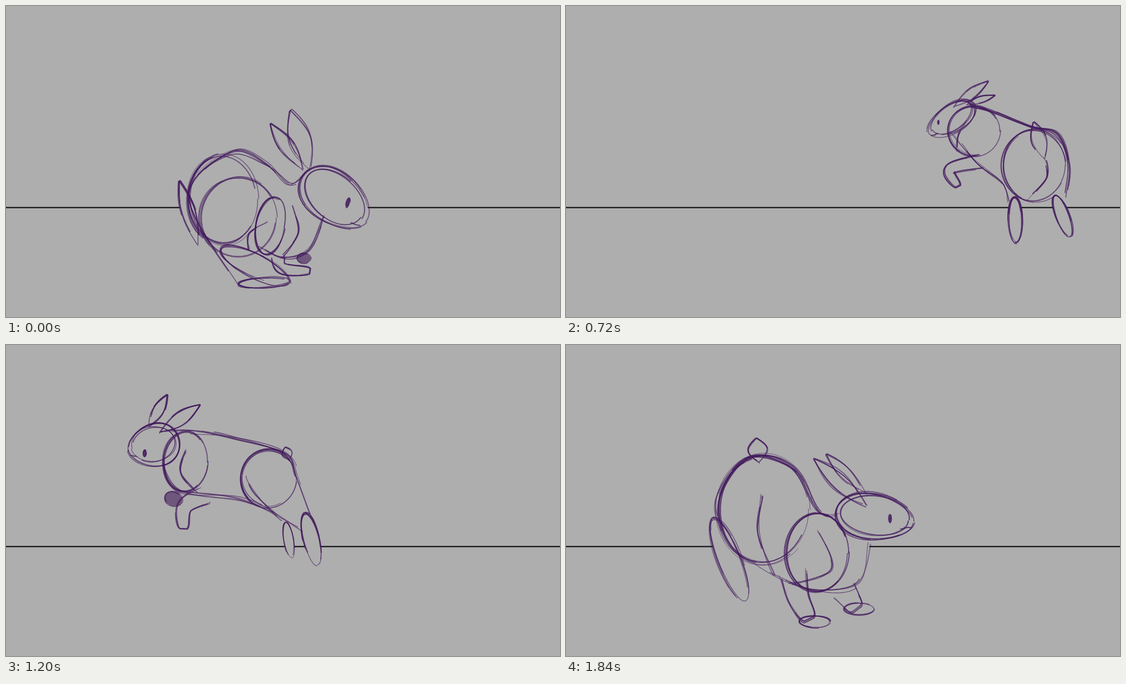
Recreate the animation shown at these times as an HTML page with a canvas. Size 998x561 px, loop 1920 ms.

```html
<!DOCTYPE html>
<html lang="en">
<head>
<meta charset="utf-8">
<title>Rabbit run, rough sketch</title>
<style>
html, body { margin: 0; width: 100%; height: 100%; overflow: hidden; background: #aeaeae; }
canvas { display: block; }
</style>
</head>
<body>
<canvas id="stage" width="998" height="561"></canvas>
<script>
const ctx = document.getElementById('stage').getContext('2d');
const LOOP = 1920, TICK = 40, N = 48, PAPER = '#aeaeae', INK = '#421a5c';
const TAU = 2 * Math.PI;
const sample = f => Array.from({ length: N }, (_, i) => f(i / (N - 1)));

// Shape builders: each turns a few numbers into an outline

function egg(cx, cy, rx, ry, deg = 0, taper = .14) {
  const r = deg * Math.PI / 180, c = Math.cos(r), s = Math.sin(r);
  return sample(t => {
    const u = Math.cos(t * TAU), x = rx * u, y = ry * Math.sin(t * TAU) * (1 - taper * u);
    return [cx + x * c - y * s, cy + x * s + y * c];
  });
}

const ellipse = (cx, cy, rx, ry, deg) => egg(cx, cy, rx, ry, deg, 0);

// Smooth curve through x,y pairs
function curve(...v) {
  const last = v.length / 2 - 1;
  const at = (i, k) => v[Math.max(0, Math.min(last, i)) * 2 + k];
  return sample(t => {
    const u = t * last, j = Math.min(last - 1, Math.floor(u)), f = u - j;
    return [0, 1].map(k => {
      const a = at(j - 1, k), b = at(j, k), c = at(j + 1, k), d = at(j + 2, k);
      return b + f / 2 * (c - a + f * (2 * a - 5 * b + 4 * c - d + f * (3 * (b - c) + d - a)));
    });
  });
}

// Rounded foot between two ends
const foot = (x0, y0, x1, y1, w) =>
  ellipse((x0 + x1) / 2, (y0 + y1) / 2, Math.hypot(x1 - x0, y1 - y0) / 2, w,
    Math.atan2(y1 - y0, x1 - x0) * 180 / Math.PI);

// Ear or tail with a pointed tip
function leaf(x0, y0, x1, y1, w) {
  const dx = x1 - x0, dy = y1 - y0, len = Math.hypot(dx, dy);
  return sample(t => {
    const u = 1 - Math.abs(1 - 2 * t), side = (t < .5 ? 1 : -1) * w * Math.sin(Math.PI * u) / len;
    return [x0 + dx * u - dy * side, y0 + dy * u + dx * side];
  });
}

// Leg along shoulder, knee and paw, open at the top
function limb(sx, sy, kx, ky, px, py, w) {
  const bone = curve(sx, sy, kx, ky, px, py);
  const edge = side => bone.slice(1).map(([x, y], i) => {
    const dx = x - bone[i][0], dy = y - bone[i][1], len = Math.hypot(dx, dy) || 1, u = i / N;
    const half = side * w * (1.5 - .6 * u) * Math.sqrt(1 - u ** 10);
    return [x - dy / len * half, y + dx / len * half];
  });
  return [...edge(1), ...edge(-1).reverse()].filter((_, i) => i % 2);
}

// Builder and number of pencil passes for each part
const parts = {
  rump: [ellipse, 7], chest: [ellipse, 5], thigh: [ellipse, 5], head: [egg, 5],
  back: [curve, 6], belly: [curve, 4], haunch: [curve, 4], blade: [curve, 4],
  tail: [leaf, 4], earA: [leaf, 4], earB: [leaf, 4],
  hindA: [foot, 6], hindB: [foot, 5], foreA: [limb, 4], foreB: [limb, 4],
  pawA: [ellipse, 4], pawB: [ellipse, 4], dark: [ellipse, 3],
  eye: [ellipse, 2], eye2: [ellipse, 2], nose: [ellipse, 2]
};
const solid = ['eye', 'eye2', 'nose', 'dark'];

const crouch = {
  rump: [391, 349, 63, 82, 0], chest: [476, 397, 26, 53, 10], thigh: [419, 382, 70, 73, 0],
  head: [592, 347, 70, 46, 38], eye: [616, 355, 3, 9, 15],
  earA: [535, 296, 476, 210, 13], earB: [547, 295, 512, 186, 20], tail: [345, 430, 312, 313, 13],
  back: [545, 299, 513, 322, 470, 285, 405, 265, 330, 345, 420, 498],
  belly: [572, 380, 545, 440, 500, 454, 455, 432],
  haunch: [437, 440, 437, 412, 470, 388], blade: [515, 362, 527, 410, 497, 452],
  hindA: [386, 438, 512, 499, 21], hindB: [418, 502, 511, 496, 9],
  foreA: [490, 452, 498, 474, 548, 477, 8], dark: [537, 455, 12, 9, 0]
};

const rear = {
  rump: [822, 309, 64, 73, 0], tail: [820, 290, 822, 217, 17],
  back: [780, 241, 822, 234, 862, 246, 887, 285, 893, 340, 885, 405],
  belly: [768, 360, 800, 385, 850, 410, 880, 398],
  haunch: [794, 353, 828, 333, 851, 348], blade: [819, 285, 816, 330, 823, 377],
  hindA: [783, 308, 744, 404, 16], hindB: [870, 303, 869, 415, 14],
  foreA: [828, 395, 829, 420, 837, 444, 11], pawA: [838, 446, 14, 7, 0],
  foreB: [873, 400, 872, 418, 868, 434, 10], pawB: [867, 434, 14, 6, 0]
};

const leap = {
  rump: [844, 288, 58, 65, 0], chest: [735, 225, 46, 45, 0],
  head: [694, 204, -48, 25, -33], eye: [671, 210, 1.5, 4, 0],
  earA: [698, 182, 762, 135, 9], earB: [722, 178, 774, 160, 6], tail: [862, 276, 842, 208, 13],
  back: [730, 179, 765, 187, 835, 218, 885, 232, 907, 285, 902, 342],
  belly: [694, 226, 735, 278, 785, 318, 797, 355],
  haunch: [862, 272, 866, 310, 830, 350], blade: [722, 206, 706, 235, 704, 262],
  hindA: [808, 345, 811, 427, 12], hindB: [881, 342, 908, 416, 12],
  foreA: [750, 280, 692, 295, 706, 325, 8]
};

const land = {
  rump: [643, 287, 48, 51, 0], chest: [567, 334, 29, 44, 0],
  head: [503, 287, -45, 25, -5], eye: [486, 282, 1.7, 5, 10],
  earA: [522, 266, 560, 207, 8], earB: [535, 276, 578, 218, 9], tail: [678, 248, 655, 213, 9],
  back: [548, 296, 580, 262, 615, 240, 655, 231, 684, 258, 700, 288],
  belly: [513, 314, 525, 358, 565, 380, 655, 345],
  haunch: [574, 331, 586, 344, 602, 348], blade: [548, 318, 545, 350, 578, 381],
  hindA: [698, 286, 682, 380, 13], dark: [640, 355, 20, 8, -40],
  foreA: [583, 375, 590, 395, 585, 410, 11], pawA: [582, 412, 19, 7, 0],
  foreB: [550, 372, 545, 388, 535, 396, 8], pawB: [533, 397, 14, 6, 0]
};

const flight = {
  rump: [473, 241, 49, 52, 0], chest: [323, 211, 40, 55, 0],
  head: [266, 181, -47, 37, -12], eye: [250, 195, 3, 6, 0],
  earA: [258, 147, 291, 89, 10], earB: [277, 158, 350, 108, 11], tail: [510, 207, 503, 184, 9],
  back: [290, 157, 340, 157, 400, 165, 500, 193, 525, 240, 550, 305],
  belly: [280, 205, 310, 262, 430, 280, 540, 335],
  haunch: [433, 235, 448, 268, 498, 318], blade: [324, 190, 314, 230, 345, 266],
  hindA: [539, 303, 560, 397, 14], hindB: [504, 320, 514, 384, 9],
  foreA: [360, 270, 322, 292, 320, 331, 11], dark: [302, 278, 16, 13, 20]
};

const spring = {
  rump: [163, 297, 53, 60, 0], chest: [264, 255, 47, 55, 0],
  head: [337, 207, 55, 38, 25], eye: [343, 218, 2.5, 6.5, -5],
  eye2: [379, 216, 2, 5, 0], nose: [363, 233, 5.5, 2, 0],
  earA: [310, 180, 231, 135, 11], earB: [345, 170, 303, 113, 9],
  back: [290, 182, 240, 205, 190, 220, 145, 242, 112, 285, 105, 345],
  belly: [318, 245, 300, 305, 218, 300, 185, 352],
  haunch: [143, 268, 151, 305, 107, 382], blade: [248, 228, 268, 270, 235, 318],
  hindA: [114, 348, 88, 419, 12], hindB: [179, 348, 176, 420, 10],
  foreA: [235, 312, 255, 340, 263, 374, 13], foreB: [290, 308, 315, 328, 333, 356, 9]
};

const brake = {
  rump: [357, 297, 83, 97, 0], chest: [452, 375, 56, 70, 0],
  head: [556, 310, 70, 41, 8], eye: [584, 313, 3, 8, 0],
  earA: [540, 290, 445, 204, 15], earB: [540, 268, 467, 196, 10], tail: [348, 212, 343, 167, 17],
  back: [490, 306, 455, 298, 410, 222, 330, 204, 273, 275, 280, 335],
  belly: [548, 355, 525, 432, 440, 441, 340, 395],
  haunch: [353, 270, 347, 340, 375, 415], blade: [452, 333, 479, 405, 400, 432],
  hindA: [266, 312, 322, 464, 21],
  foreA: [408, 408, 418, 455, 440, 495, 16], pawA: [448, 499, 28, 11, 0],
  foreB: [500, 442, 512, 460, 525, 476, 15], pawB: [528, 476, 28, 11, 0]
};

// Move the rump to x,y and scale around it; a negative sx mirrors
function place(pose, x, y, sx = 1, sy = 1) {
  const [ox, oy] = pose.rump, round = [ellipse, egg];
  const X = n => x + (n - ox) * sx, Y = n => y + (n - oy) * sy;
  return Object.fromEntries(Object.entries(pose).map(([name, v]) => {
    if (round.includes(parts[name][0])) {
      const [cx, cy, rx, ry, deg] = v;
      return [name, [X(cx), Y(cy), rx * sx, ry * sy, deg * Math.sign(sx)]];
    }
    // An odd last number is a width
    return [name, v.map((n, i) => i % 2 ? Y(n) : i === v.length - 1 ? n * sy : X(n))];
  }));
}

const keys = [
  [0, crouch],
  [80, place(flight, 506, 343, -1)],
  [200, place(flight, 620, 258, -.97, .93)],
  [320, place(brake, 763, 292, .62, .75)],
  [400, rear],
  [480, place(rear, 835, 319, 1.05, .94)],
  [560, place(crouch, 880, 347, -.6, .66)],
  [720, leap],
  [760, place(flight, 798, 280, .88, .82)],
  [880, land],
  [1000, place(crouch, 563, 332, -.72, .66)],
  [1120, place(flight, 545, 300, .88, .98)],
  [1200, flight],
  [1320, place(flight, 338, 276, .94, .89)],
  [1360, place(land, 257, 281, 1, 1.1)],
  [1440, place(land, 202, 303, .72, 1.07)],
  [1560, place(crouch, 121, 347, .57, .66)],
  [1680, spring],
  [1760, place(spring, 252, 320, 1.1)],
  [1840, brake],
  [LOOP, crouch]
];

// Drawings are held for one or two ticks, mostly in turn
const holds = [2, 2, 1, 2, 1, 2, 2, 1, 1, 2, ...Array(9).fill([2, 1]).flat(), 1, 1, 1, 2];
let clock = 0;
const starts = holds.map(h => (clock += h * TICK) - h * TICK);

const mix = (p, q, f) => p.map((n, i) => n + (q[i] - n) * f);

function poseAt(t) {
  const k = keys.findIndex(key => key[0] > t);
  const [t0, a] = keys[k - 1], [t1, b] = keys[k], f = (t - t0) / (t1 - t0);
  if (!f) return a;
  // Parts found in one pose only ride along with the rump
  const [x, y] = mix(a.rump, b.rump, f), pose = place(f < .5 ? a : b, x, y);
  for (const name in pose)
    if (a[name] && b[name]) pose[name] = mix(a[name], b[name], f);
  return pose;
}

let seed = 1;
const rand = (lo = 0, hi = 1) => lo + (hi - lo) * (seed = seed * 16807 % 2147483647) / 2147483647;

function trace(pts) {
  ctx.beginPath();
  pts.forEach(p => ctx.lineTo(...p));
}

// Several loose pencil passes over one line
function sketch(pts, passes) {
  const xs = pts.map(p => p[0]), ys = pts.map(p => p[1]);
  const x0 = Math.min(...xs), x1 = Math.max(...xs), y0 = Math.min(...ys), y1 = Math.max(...ys);
  const cx = (x0 + x1) / 2, cy = (y0 + y1) / 2, wobble = .4 + Math.hypot(x1 - x0, y1 - y0) * .009;
  for (let i = 0; i < passes; i++) {
    const from = i ? Math.floor(rand(0, .4) * N) : 0, to = i ? N - Math.floor(rand(0, .35) * N) : N;
    const p = rand(0, TAU), q = rand(0, TAU), grow = rand(.975, 1.025);
    trace(pts.map(([x, y], j) => [
      cx + (x - cx) * grow + wobble * Math.sin(j * .16 + p),
      cy + (y - cy) * grow + wobble * Math.sin(j * .19 + q)
    ]).slice(from, to));
    ctx.globalAlpha = rand(.5, .8);
    ctx.lineWidth = rand(.9, 2.2);
    ctx.stroke();
  }
}

function draw(i) {
  const pose = poseAt(starts[i]), shapes = {};
  for (const name in pose) shapes[name] = parts[name][0](...pose[name]);
  seed = 977 + i * 7919;

  ctx.globalAlpha = 1;
  ctx.fillStyle = PAPER;
  ctx.fillRect(0, 0, 998, 561);
  ctx.fillStyle = '#101010';
  ctx.fillRect(0, 362.5, 998, 2.2);

  // Paper-coloured body hides the horizon
  ctx.fillStyle = PAPER;
  const body = [...shapes.back, ...[...shapes.belly].reverse()];
  const closed = Object.keys(shapes).filter(name => parts[name][0] !== curve);
  for (const pts of [body, ...closed.map(name => shapes[name])]) {
    trace(pts);
    ctx.fill();
  }

  ctx.fillStyle = ctx.strokeStyle = INK;
  ctx.lineCap = ctx.lineJoin = 'round';
  for (const name in shapes) {
    if (solid.includes(name)) {
      trace(shapes[name]);
      ctx.globalAlpha = name === 'dark' ? .6 : .85;
      ctx.fill();
    }
    sketch(shapes[name], parts[name][1]);
  }

  if (pose.head) {
    const [x, y, rx, ry, deg] = pose.head;
    sketch(ellipse(x, y - 2, rx * .86, ry * .86, deg), 2);
    const [tip, lip] = [egg(x, y, rx, ry, deg)[2], egg(x, y, rx * .82, ry * .82, deg)[4]];
    sketch(curve(...tip, ...lip), 2);
  }
}

let shown = -1;
function tick() {
  const t = performance.now() % LOOP;
  const i = starts.findLastIndex(s => s <= t);
  if (i !== shown) draw(shown = i);
  requestAnimationFrame(tick);
}
tick();
</script>
</body>
</html>
```
